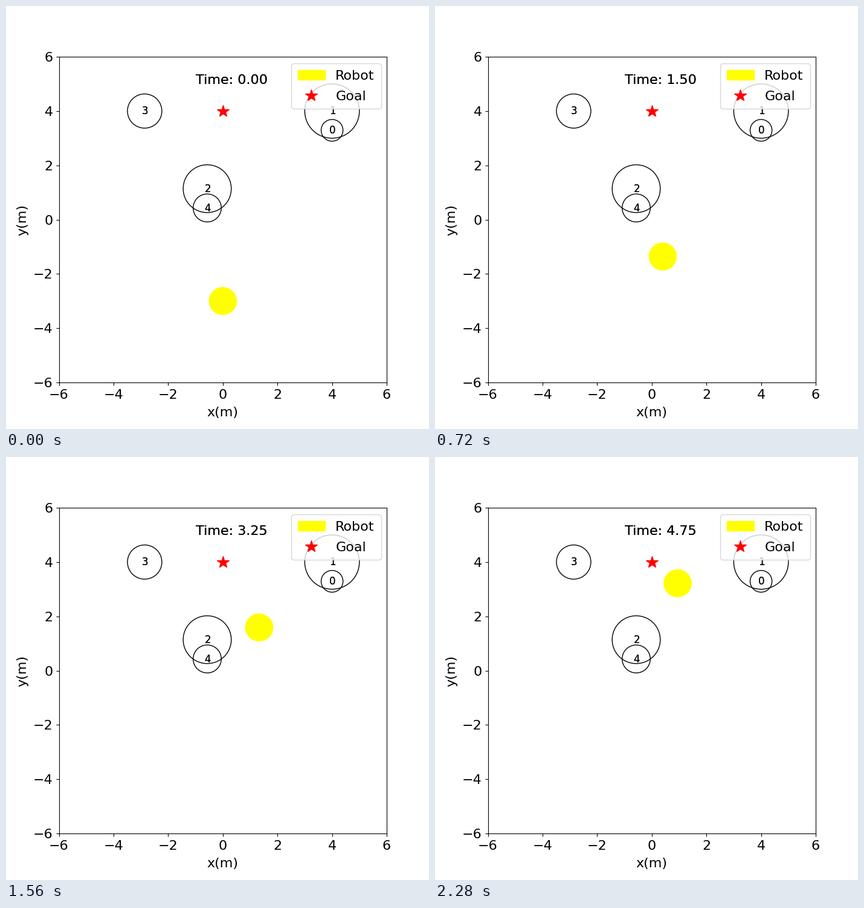
A matplotlib script that plays this animation: 700 by 700 pixels, repeating every 2400 ms.

```python
import numpy as np
import matplotlib.pyplot as plt
from matplotlib.animation import FuncAnimation
from matplotlib.lines import Line2D

FRAMES, INTERVAL, DT = 20, 120, 0.25

# x, y, radius of each obstacle
OBSTACLES = [(4, 3.29, 0.4), (4, 4, 1), (-0.57, 1.14, 0.88),
             (-2.86, 4, 0.63), (-0.57, 0.43, 0.515)]

# a few points on the robot's path and the step at which each is reached
STEPS = np.array([0, 4, 6, 8, 11, 15, 19])
PATH = np.array([(0, -3), (0.3, -2.17), (0.4, -1.36), (0.65, -0.5),
                 (1.06, 0.77), (1.465, 2.31), (0.945, 3.22)])
VELOCITY = np.gradient(PATH, STEPS, axis=0)
VELOCITY[0] = 0.02, 0.05  # starts nearly at rest


def robot_at(step):
    """Smooth (cubic Hermite) motion along the path."""
    i = min(np.searchsorted(STEPS, step, side="right"), len(STEPS) - 1) - 1
    h = STEPS[i + 1] - STEPS[i]
    u = (step - STEPS[i]) / h
    ease = u * u * (3 - 2 * u)
    bend = (1 - u) * VELOCITY[i] - u * VELOCITY[i + 1]
    return (1 - ease) * PATH[i] + ease * PATH[i + 1] + h * u * (1 - u) * bend


def heavy_text(x, y, text, size):
    """Text painted twice, which gives it a slightly heavier edge."""
    label = ax.text(x, y, text, fontsize=size, color="black")
    ax.add_artist(label)
    return label


plt.rcParams["font.family"] = "DejaVu Sans"
fig, ax = plt.subplots(figsize=(7, 7), dpi=100)
ax.set(xlim=(-6, 6), ylim=(-6, 6))
ax.tick_params(labelsize=16)
ax.tick_params(axis="x", pad=4.5)
ax.set_xlabel("x(m)", fontsize=16, labelpad=6.5)
ax.set_ylabel("y(m)", fontsize=16, labelpad=5.5)

robot = plt.Circle(PATH[0], 0.5, color="yellow")
goal = Line2D([0], [4], color="red", marker="*", linestyle="None", markersize=15)
ax.add_artist(robot)
ax.add_artist(goal)
ax.legend([robot, goal], ["Robot", "Goal"], fontsize=16, loc="upper right",
          bbox_to_anchor=(1.003, 1), labelspacing=0.63, borderpad=0.48)

for n, (x, y, r) in enumerate(OBSTACLES):
    ax.add_artist(plt.Circle((x, y), r, fill=False))
    heavy_text(x - 0.1, y - 0.12, str(n), 12)

clock = heavy_text(-1, 5, "Time: 0.00", 16)


def update(step):
    robot.center = robot_at(step)
    clock.set_text(f"Time: {step * DT:.2f}")
    return robot, clock


anim = FuncAnimation(fig, update, frames=FRAMES, interval=INTERVAL,
                     repeat=True, repeat_delay=0)
plt.show()
```
